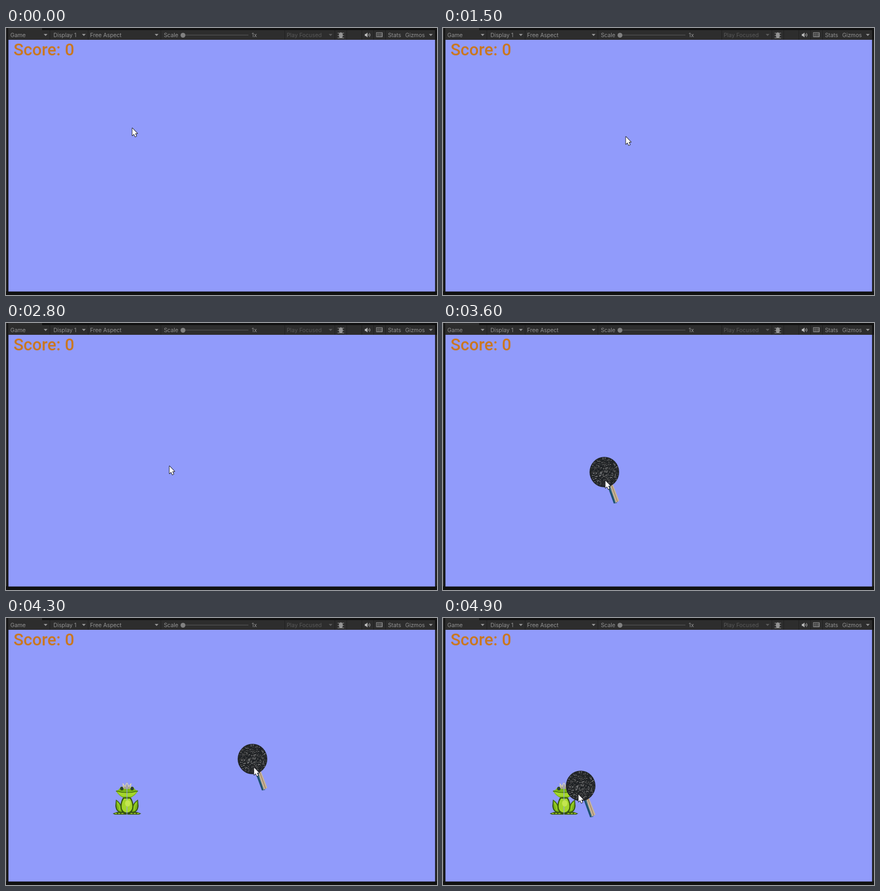
These frames come from a looping animation (800 px wide and 497 px high, 5000 ms). An HTML page with a canvas:

```html
<!DOCTYPE html>
<html lang="en">
<head>
<meta charset="utf-8">
<title>Paddle game</title>
<style>
html, body { margin: 0; width: 100%; height: 100%; overflow: hidden; background: #111; }
canvas { display: block; width: 800px; height: 497px; }
</style>
</head>
<body>
<canvas id="stage" width="800" height="497"></canvas>
<script>
const ctx = document.getElementById('stage').getContext('2d');
const LOOP = 5000, STEP = 100;
const PADDLE_FROM = 34, FROG_FROM = 43;

const key = (step, x, y) => ({ step, x, y });

// Turning points of the hand; a smooth curve joins them
const path = [
  key(0, 234, 186), key(12, 342, 190), key(15, 339, 202),
  key(20, 392, 271), key(21, 392, 271), key(28, 303, 266),
  key(32, 263, 285), key(33, 263, 285), key(36, 301, 293), key(39, 305, 286),
  key(41, 410, 240), key(45, 482, 322), key(47, 420, 313), key(49, 251, 328)
];

function slope(i, axis) {
  const before = path[Math.max(i - 1, 0)], after = path[Math.min(i + 1, path.length - 1)];
  return (after[axis] - before[axis]) / (after.step - before.step);
}

// Cubic Hermite curve through the keys
function along(step, axis) {
  const i = Math.max(1, path.findIndex(k => k.step >= step));
  const a = path[i - 1], b = path[i], span = b.step - a.step;
  const t = (step - a.step) / span, ease = t * t * (3 - 2 * t);
  const bend = t * (1 - t) * ((1 - t) * slope(i - 1, axis) - t * slope(i, axis));
  return Math.round(a[axis] + (b[axis] - a[axis]) * ease + span * bend);
}

const pointerAt = step => ({ x: along(step, 'x'), y: along(step, 'y') });

// The paddle trails slightly behind a fast pointer
function paddleAt(step) {
  const { x, y } = pointerAt(step);
  const lag = (x - along(step - 1, 'x')) * 0.11;
  return { x: Math.round(x - 28 - Math.max(-5, Math.min(5, lag))), y: y - 44 };
}

function seeded(seed) {
  return () => (seed = (seed * 16807) % 2147483647) / 2147483647;
}

function rect(color, x, y, w, h) {
  ctx.fillStyle = color;
  ctx.fillRect(x, y, w, h);
}

function fill(color, d) {
  ctx.fillStyle = color;
  ctx.fill(new Path2D(d));
}

function stroke(color, width, d) {
  ctx.strokeStyle = color;
  ctx.lineWidth = width;
  ctx.stroke(new Path2D(d));
}

function oval(color, x, y, rx, ry = rx) {
  ctx.fillStyle = color;
  ctx.beginPath();
  ctx.ellipse(x, y, rx, ry, 0, 0, Math.PI * 2);
  ctx.fill();
}

function text(label, x, y, font, color) {
  ctx.font = font;
  ctx.fillStyle = color;
  ctx.fillText(label, x, y);
}

function at({ x, y }, paint) {
  ctx.save();
  ctx.translate(x, y);
  paint();
  ctx.restore();
}

const GREY = '#939393', DIM = '#595959';
const label = (name, x, color = GREY) => text(name, x, 17, '10.3px Inter, sans-serif', color);
const separator = x => rect('#202020', x, 4, 1, 18);

function dropdown(name, x, right, color = GREY) {
  label(name, x, color);
  fill(color, `M${right - 11} 11h7l-3.5 4z`);
  separator(right);
}

function drawToolbar() {
  rect('#111', 0, 0, 800, 497);
  rect('#292929', 0, 0, 2, 490);
  rect('#292929', 798, 22, 2, 468);
  rect('#2d2d2d', 4, 4, 793, 18);
  rect('#2d2d2d', 4, 0, 63, 4);

  dropdown('Game', 8, 81);
  dropdown('Display 1', 88, 152);
  dropdown('Free Aspect', 156, 287);
  dropdown('Play Focused', 521, 610, DIM);
  dropdown('Gizmos', 741, 796);
  label('Scale', 293);
  label('1x', 456);
  label('Stats', 709);
  separator(517);
  separator(632);
  for (let x = 660; x <= 704; x += 22) separator(x);

  rect('#4c4c4c', 328, 12.5, 122, 1.5);
  oval('#818181', 328.5, 13.5, 4.5);

  // Bug
  for (let y = 9; y <= 18; y += 4.5) rect(GREY, 615.5, y, 12, 1);
  oval(GREY, 621.5, 13.5, 3.7, 5.5);

  // Speaker
  fill('#b5b5b5', 'M666 11h2l3-2.5v9l-3-2.5h-2z');
  stroke('#b5b5b5', 1, 'M672.5 11q2 2 0 4M674.5 9.5q3 3.5 0 7');

  // Keyboard
  stroke(GREY, 1, 'M687.5 8.5h11v8h-11z');
  for (let x = 689; x < 698; x += 2.5) {
    for (let y = 10; y < 15; y += 2.2) rect(GREY, x, y, 1.5, 1.3);
  }
}

function drawFrogHalf() {
  const dark = '#35530f', mid = '#7cb518', light = '#a4d62b';
  // Foot, thigh and arm
  fill('#3b5713', 'M-4 56L-18 56L-26 59L-22 61L0 61V56z');
  for (let x = -22; x < -4; x += 6) rect(light, x, 58, 4, 1.5);
  fill(dark, 'M-7 58Q-20 58-21 45L-20 33Q-11 38-8 50z');
  fill(mid, 'M-9 56Q-18 56-19 45L-19 35Q-12 40-10 49z');
  stroke(light, 1.5, 'M-17 39Q-13 45-13 53');
  // Chest
  fill(dark, 'M0 28H-6Q-13 38-11 50Q-8 59 0 59z');
  fill(light, 'M0 31H-5Q-11 40-9 50Q-6 57 0 57z');
  // Head
  fill(mid, 'M0 11L-8 10Q-13 10-14 14L-20 17Q-16 24-8 29H0z');
  fill(light, 'M0 20Q-10 20-18 18Q-14 24-8 27H0z');
  stroke(dark, 1.2, 'M-20 17Q-10 20 0 20M-6 30H0');
  oval(dark, -9, 12.5, 3.2, 3.5);
  oval('#26364c', -9, 12.5, 2);
  // Crown
  fill('#a9a591', 'M0 13H-6L-8 2L-3 7L0 0z');
  stroke('#e6e3d2', 1, 'M-6 11L-7 3L-3 9L0 2');
}

function drawFrog() {
  at({ x: 224, y: 305 }, () => {
    drawFrogHalf();
    ctx.translate(1, 0);
    ctx.scale(-1, 1);
    drawFrogHalf();
    oval('#c3e64f', -1, 40, 5, 6);
  });
}

// Short dashes in rows, brightest in a band across the middle
const random = seeded(77);
const specks = Array.from({ length: 520 }, () => {
  const angle = random() * Math.PI * 2, radius = Math.sqrt(random()) * 26;
  const y = Math.round((28 + Math.sin(angle) * radius) / 2) * 2;
  const band = Math.exp(-(((y - 32) / 4) ** 2));
  return {
    x: Math.round(27 + Math.cos(angle) * radius),
    y,
    width: 1 + Math.floor(random() * 2.3),
    shade: 50 + random() ** 2 * (110 + 90 * band)
  };
});

function drawPaddle() {
  fill('#1d5072', 'M33 54L39 52L51 86L45 87z');
  fill('#c9b497', 'M38 53L43 51L55 82L48 86z');
  stroke('#75919a', 1, 'M37 54L49 86');
  stroke('#8c7155', 1, 'M41 53L52 84');
  oval('#202326', 27.5, 28.5, 27.5, 28.3);
  for (const { x, y, width, shade } of specks) rect(`rgb(${shade},${shade},${shade})`, x, y, width, 1);
}

function drawPointer() {
  const arrow = 'M.5 .5V14L3.6 11.2L5.8 16.2L8 15.2L5.8 10.3H9.8Z';
  ctx.lineJoin = 'round';
  stroke('#16161c', 1.8, arrow);
  fill('#fff', arrow);
}

function draw(time) {
  const step = Math.floor((time % LOOP) / STEP);
  drawToolbar();
  rect('#919bfb', 4.5, 22, 792, 468.5);
  text('Score: 0', 14, 50.7, '500 30.8px Roboto, sans-serif', '#ca7720');
  if (step >= FROG_FROM) drawFrog();
  if (step >= PADDLE_FROM) at(paddleAt(step), drawPaddle);
  at(pointerAt(step), drawPointer);
}

let start;
function tick(now) {
  start ??= now;
  draw(now - start);
  requestAnimationFrame(tick);
}
draw(0);
requestAnimationFrame(tick);
</script>
</body>
</html>
```
